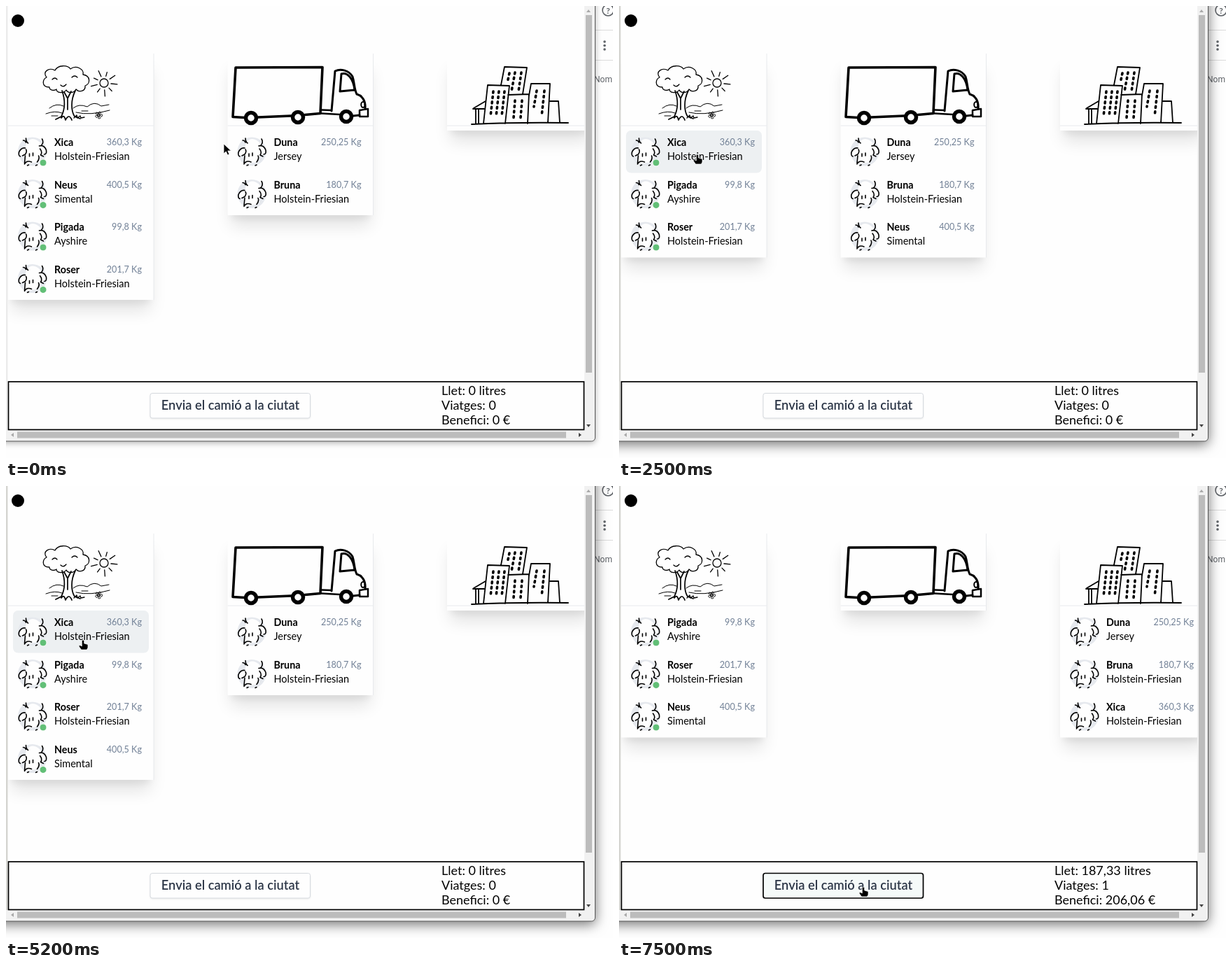
Write an HTML page that moves like this. It is 867x646 px and loops after 8 s.

```html
<!DOCTYPE html>
<html lang="ca">
<head>
<meta charset="utf-8">
<title>Vaques al camió</title>
<style>
  html, body { margin: 0; width: 100%; height: 100%; overflow: hidden; background: #fefefe; }
  svg { display: block; font-family: Lato, sans-serif; }
  .ink { fill: none; stroke: #000; stroke-width: 1.3; stroke-linecap: round; stroke-linejoin: round; }
  .window { fill: #f1f1f1; stroke: #555; filter: drop-shadow(0 2px 4px rgba(0,0,0,.3)); }
  .focused .window { filter: drop-shadow(0 4px 9px rgba(0,0,0,.55)); }
  .edge { fill: #ececec; }
  .focused .edge { fill: #d6d6d2; }
  .far { filter: blur(12.5px); opacity: .11; }
  .near { filter: blur(5px); opacity: .05; }
  .paper { fill: #fefefe; }
  .hover { fill: #edf0f2; }
  .name { font-weight: bold; font-size: 14.3px; }
  .breed { font-size: 14.5px; }
  .kg { font-size: 12.6px; fill: #718096; text-anchor: end; }
  .note { font-size: 18px; }
  .button rect { fill: #fefefe; stroke: #d5d9de; filter: drop-shadow(0 1px 1px rgba(0,0,0,.08)); }
  .button text { font-size: 18.3px; font-weight: 600; fill: #2d3748; text-anchor: middle; }
  .button.over rect { fill: #f5faf9; }
  .button.pressed rect { stroke: #000; stroke-width: 1.7; }
  .thumb { fill: #bcbcbc; }
</style>
</head>
<body>
<svg id="stage" width="867" height="646" viewBox="0 0 867 646">
  <defs>
    <g id="cow">
      <circle cx="21" cy="21" r="20.500" fill="#e6e9ee"/>
      <path fill="#fefefe" d="M13 8Q22-3 34 10L41 19 38 25 33 26 29 36 10 39 11 26 3 27 3 19 11 16Z"/>
      <path class="ink" style="stroke-width:1.6" d="M12 2Q12 7 15 9M8 5Q11 5 12 8M11 16Q5 15 2 22Q1 27 4 28M12 18Q14 21 11 25L7 27M11 27L10 38
        M35 3Q38 8 34 12M31 13Q38 11 41 19Q42 25 38 25M32 17Q36 22 33 26L37 28M10 39Q13 33 20 36M28 36Q32 31 30 27
        M17 24v4M22 23v4M14 41l2-1M26 41l2-1"/>
    </g>
    <path id="arrow" d="M0 0V14L3.3 11 5.5 16 8 15 5.8 10H10.5Z" stroke="#fff" stroke-width=".8"/>
    <path id="hand" d="M-1.7 1Q0-1 1.7 1V5L7 6.5V11L5.5 14H-2.5L-6 9Q-6 7-3.5 8L-1.7 9Z" stroke="#fff" stroke-width=".7"/>
  </defs>

  <!-- page behind the window -->
  <rect class="paper" width="867" height="646"/>
  <path d="M842 34.5H867M842 77.5H867" stroke="#dcdcdc"/>
  <g fill="#5f6368">
    <circle cx="855" cy="51" r="1.8"/><circle cx="855" cy="56.5" r="1.8"/><circle cx="855" cy="62" r="1.8"/>
    <circle cx="860" cy="6" r="8" fill="none" stroke="#5f6368" stroke-width="1.6"/>
    <text x="860" y="10.500" text-anchor="middle" font-size="12" font-weight="bold">?</text>
    <text x="840" y="109" style="font:12px Roboto,sans-serif">Nom</text>
  </g>

  <rect class="window" x="-20" y="-20" width="861.5" height="642" rx="5"/>
  <rect class="paper" width="826" height="606"/>
  <rect class="edge" width="2.5" height="606"/>

  <!-- scroll bars -->
  <rect class="thumb" x="828" y="13" width="9" height="511"/>
  <rect class="thumb" x="16" y="608.5" width="784" height="9"/>
  <path fill="#aaa" d="M829 9h6l-3-4ZM11 610v6l-4-3Z"/>
  <path fill="#444" d="M829 598h6l-3 4ZM818 610v6l4-3Z"/>

  <circle cx="17" cy="21" r="9"/>

  <svg x="2.5" width="823.5" height="606" viewBox="2.5 0 823.5 606">
    <g id="cards"></g>

    <!-- meadow -->
    <g class="ink">
      <path d="M62 116C50 116 52 104 58 102C51 94 62 87 70 92C74 84 88 84 92 90C100 84 112 90 110 98C122 100 120 112 113 114C114 122 104 124 100 119C96 126 88 124 86 120C82 126 72 124 72 119C68 122 62 120 62 116ZM66 105q4-4 7 0M94 102q4-4 8 0M78 113q4 4 8-1"/>
      <path stroke-width="1.7" d="M80 121C85 135 84 148 79 158L71 162M99 121C92 135 93 150 98 158L106 161M83 123L88 132 93 122M88 132V148M79 160Q83 154 85 163Q90 153 94 163"/>
      <path stroke-width="1" d="M62 146Q72 138 82 143M96 146Q104 139 116 144Q126 135 136 143L147 141M57 154Q70 149 80 153M100 152Q120 157 148 149M65 157h9M108 150h9"/>
      <path d="M97 160l4-4 1 4 4-3 1 3 5-1"/>
      <circle cx="140" cy="110" r="6"/>
      <path id="rays"/>
      <circle cx="132.500" cy="156" r="1.500" stroke-width="1"/>
      <path id="petals" stroke-width="1"/>
    </g>

    <!-- truck -->
    <g class="ink" style="stroke-width:3.6">
      <path d="M341 159.500L324 158.500 328 88 452 87.500 449 153.500 427 155.500M407 157L360 159"/>
      <path stroke-width="2.500" d="M451 148.500L464 149M450 153.500L476 155"/>
      <path stroke-width="3" d="M465 150L470 93C478 89 490 92 495 101C498 110 497 118 501 126C509 128 514 136 513 147M477 122L479 97C488 94 496 104 498 120ZM477 122L498 120M496 157L505 156"/>
      <ellipse cx="510" cy="141" rx="2.800" ry="4" stroke-width="2"/>
      <path stroke-width="2.500" d="M505 149L517 147 517 158 505 158Z"/>
      <g fill="#fefefe" stroke-width="5.500">
        <circle cx="350" cy="160" r="7.500"/><circle cx="417" cy="159" r="7.500"/><circle cx="486" cy="158" r="7.500"/>
      </g>
    </g>

    <!-- city -->
    <g class="ink" style="stroke-width:1.8">
      <path d="M707 113L712 87 744 88 738 126M682 168L688 113 719 114 713 168M717 127L747 126 745 168M747 128L750 111 777 111 774 167M776 136L789 136 791 167M668 146L685 136M667 147L684 147M671 148V168M675 148V168M665 169Q730 166 803 167"/>
      <path style="stroke-width:3.600" stroke-dasharray="2 5.500" d="M719 96L716 110M727 95L722 122M736 95L732 122M696 122L692 158M704 122L700 158M712 122L708 158M727 135L725 160M737 135L735 160M758 121L754 144M769 121L765 158"/>
    </g>
  </svg>

  <!-- footer -->
  <rect class="paper" x="3.500" y="537" width="822" height="68.500" stroke="#000" stroke-width="1.7"/>
  <g id="error">
    <rect x="4" y="561" width="203" height="21"/>
    <text class="note" x="4" y="577" fill="#fff">La vaca pesa massa</text>
  </g>
  <g id="button" class="button">
    <rect x="206" y="553.500" width="228.500" height="35.500" rx="3"/>
    <text x="320.500" y="577">Envia el camió a la ciutat</text>
  </g>
  <g id="totals" class="note"></g>
  <use id="cursor"/>
</svg>

<script>
const $ = id => document.getElementById(id);
const LOOP = 8000, TICK = 100, ROW = 60.5;

const cows = {
  x: ['Xica', 'Holstein-Friesian', '360,3'],
  n: ['Neus', 'Simental', '400,5'],
  p: ['Pigada', 'Ayshire', '99,8'],
  r: ['Roser', 'Holstein-Friesian', '201,7'],
  d: ['Duna', 'Jersey', '250,25'],
  b: ['Bruna', 'Holstein-Friesian', '180,7'],
};

// time, cows in the meadow, in the truck, in the city
const moves = [
  [0, 'xnpr', 'db', ''],
  [1700, 'xpr', 'dbn', ''],
  [4600, 'xprn', 'db', ''],
  [5600, 'prn', 'dbx', ''],
  [7500, 'prn', '', 'dbx'],
];

// time, pointer x, y, hovered column + row
const path = [
  [0, 311, 197, ''], [200, 311, 197, ''], [300, 340, 215, '10'], [500, 385, 254, '11'],
  [600, 390, 262, '11'], [800, 390, 262, '11'], [900, 360, 262, '11'], [1000, 290, 264, ''],
  [1100, 195, 267, '01'], [1500, 109, 266, '01'], [2100, 109, 266, '01'], [2300, 111, 232, '00'],
  [2500, 112, 212, '00'], [3100, 112, 212, '00'], [3200, 95, 312, '01'], [3300, 98, 348, '02'],
  [3400, 110, 410, ''], [3700, 180, 502, ''], [4000, 282, 361, ''], [4100, 343, 356, '12'],
  [4400, 408, 335, '12'], [4600, 405, 333, ''], [4700, 405, 333, ''], [4900, 305, 306, '01'],
  [5000, 305, 306, '01'], [5100, 170, 262, '01'], [5200, 110, 220, '00'], [5400, 112, 214, '00'],
  [5900, 112, 214, '00'], [6000, 118, 215, '00'], [6100, 132, 219, ''], [6300, 345, 255, '11'],
  [6400, 370, 320, '12'], [6500, 365, 420, ''], [6700, 350, 550, ''], [6800, 344, 569, ''],
  [6900, 349, 573, 'button'], [LOOP, 349, 573, 'button'],
];

const lastBefore = (list, t) => list.findLastIndex(item => item[0] <= t);

function row(key, col, i, x, hover) {
  const [name, breed, kg] = cows[key], y = 178 + i * ROW;
  return `${hover === `${col}${i}` ? `<rect class="hover" x="${x + 7}" y="${y}" width="194" height="${ROW}" rx="7"/>` : ''}
    <use href="#cow" x="${x + 13.5}" y="${y + 9}"/>
    ${col ? '' : `<circle cx="${x + 50}" cy="${y + 46}" r="5" fill="#62bf77" stroke="#fefefe"/>`}
    <text class="name" x="${x + 66}" y="${y + 22}">${name}</text>
    <text class="breed" x="${x + 66}" y="${y + 42}">${breed}</text>
    <text class="kg" x="${x + 191}" y="${y + 21}">${kg} Kg</text>`;
}

function card(keys, col, hover) {
  const x = 3 + col * 313.5, h = 110 + keys.length * ROW;
  return `<rect class="far" x="${x + 5}" y="93" width="198" height="${h - 10}"/>
    <rect class="near" x="${x + 5}" y="83" width="198" height="${h - 10}"/>
    <rect class="paper" x="${x}" y="68" width="208" height="${h}"/>
    <path d="M${x} 171h208M${x + 208} 68v${h}" stroke="#e8eaed"/>
    ${[...keys].map((key, i) => row(key, col, i, x, hover)).join('')}`;
}

function render(t) {
  const [, ...lists] = moves[lastBefore(moves, t)];
  const k = lastBefore(path, t);
  const [t0, x0, y0, hover] = path[k], [t1, x1, y1] = path[k + 1];
  const part = (t - t0) / (t1 - t0);

  $('stage').classList.toggle('focused', t >= 900);
  $('cards').innerHTML = lists.map((keys, col) => card(keys, col, hover)).join('');
  $('error').style.display = t >= 2700 && t < 4600 ? '' : 'none';
  $('button').classList.toggle('over', t >= 6800);
  $('button').classList.toggle('pressed', t >= 7400);

  const [milk, trips, profit] = t >= 7500 ? ['187,33', 1, '206,06'] : [0, 0, 0];
  $('totals').innerHTML = [`Llet: ${milk} litres`, `Viatges: ${trips}`, `Benefici: ${profit} €`]
    .map((line, i) => `<text x="622" y="${556 + i * 21}">${line}</text>`).join('');

  $('cursor').setAttribute('href', hover ? '#hand' : '#arrow');
  $('cursor').setAttribute('transform', `translate(${x0 + (x1 - x0) * part} ${y0 + (y1 - y0) * part})`);
}

// Path data for n spokes or petals around a centre
function around(cx, cy, n, draw) {
  return Array.from({ length: n }, (_, i) => {
    const a = i * Math.PI * 2 / n + .1;
    return draw((r, turn = 0) => `${cx + r * Math.cos(a + turn)} ${cy + r * Math.sin(a + turn)}`, i);
  }).join('');
}
$('rays').setAttribute('d', around(140, 110, 9, (at, i) => `M${at(10)}L${at(i % 2 ? 16 : 19)}`));
$('petals').setAttribute('d', around(132.5, 156, 5, at => `M${at(1.5)}Q${at(6, -.6)} ${at(5)}Q${at(6, .6)} ${at(1.5)}`));

let shown = -1;
function tick() {
  const t = Math.floor(performance.now() % LOOP / TICK) * TICK;
  if (t !== shown) render(shown = t);
  requestAnimationFrame(tick);
}
tick();
</script>
</body>
</html>
```
